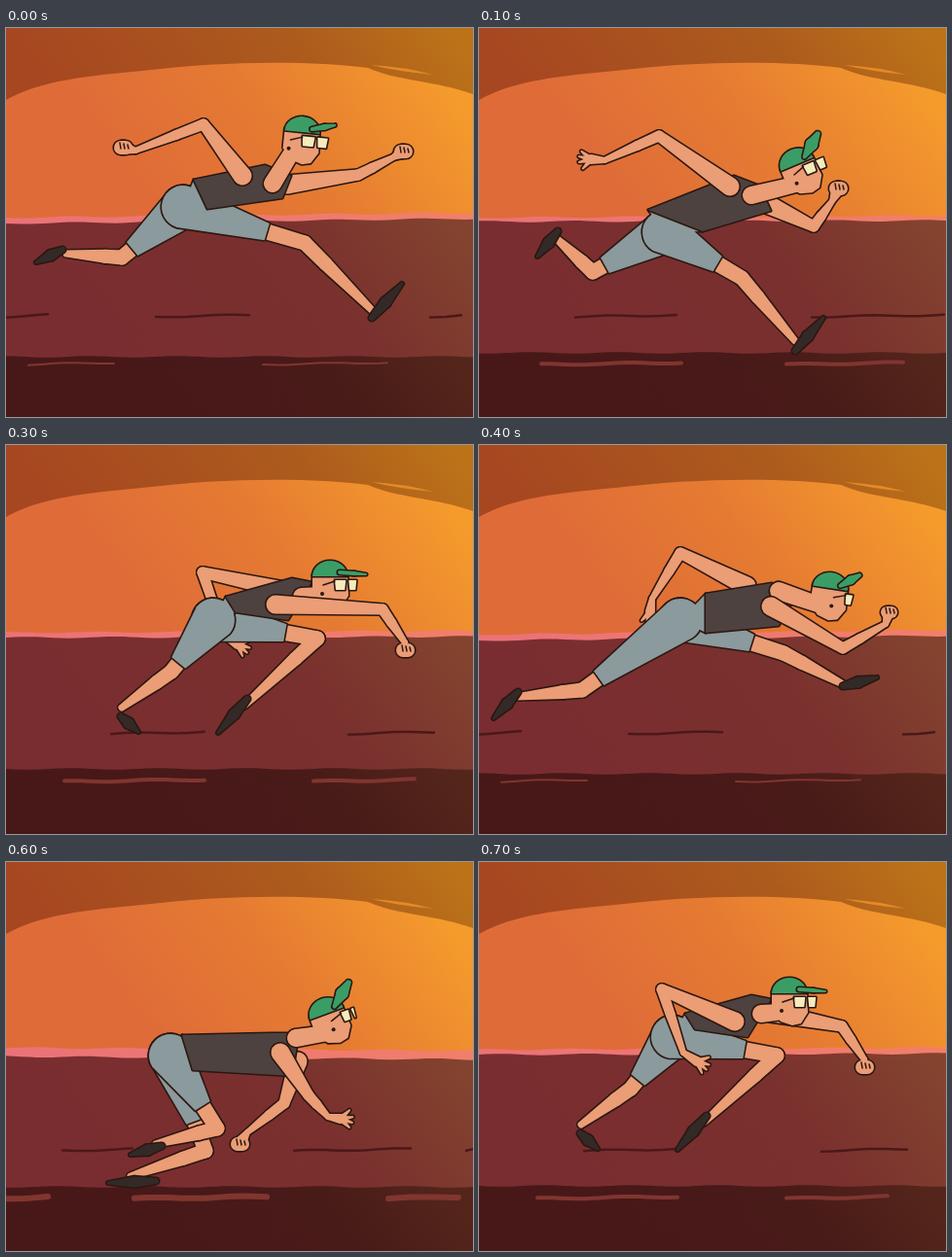
Animation, 480 px wide and 400 px high, one loop 800 ms. Source, as an HTML page with a canvas:

```html
<!DOCTYPE html>
<html>
<head>
<meta charset="utf-8">
<title>Sunset runner</title>
<style>
html, body { margin: 0; width: 100%; height: 100%; overflow: hidden; background: #7b2e30; }
canvas { display: block; }
</style>
</head>
<body>
<canvas id="stage" width="480" height="400"></canvas>
<script>
const ctx = document.getElementById('stage').getContext('2d');
const INK = '#2b1711', SKIN = '#eb9d75', TANK = '#4d4240', SHORTS = '#8b9a9c',
      SHOE = '#332a27', CAP = '#3b9d66', LENS = '#f5ebbd';

const points = s => s.split(' ').map(p => p.split(',').map(Number));
const mix = (a, b, t) => [a[0] + (b[0] - a[0]) * t, a[1] + (b[1] - a[1]) * t];

// Joints of one key pose. Torso: back waist, back shoulder, chest, belly, front waist.
// Head: place and tilt; turn: how far the face looks away; arm: elbow, wrist, hand
// (a third number makes it a fist); leg: knee, ankle, heel, toe.
function pose(torso, hip, shoulders, neck, head, turn, brim, nearArm, farArm, nearLeg, farLeg) {
  const p = points([hip, neck, head, brim].join(' '));
  return {
    torso: points(torso), hip: p[0], shoulders: points(shoulders), neck: p[1], head: p[2], turn, brim: p[3],
    arms: [nearArm, farArm].map(points), legs: [nearLeg, farLeg].map(points), shift: 0
  };
}
const swapped = (p, shift) => ({ ...p, arms: [...p.arms].reverse(), legs: [...p.legs].reverse(), shift });

const leap = pose('193,156 266,141 293,152 284,175 207,186', '182,184', '243,152 289,161',
  '274,160', '303,120,.1', 1, '338,100',
  '203,99 133,126 120,123,9', '362,151 398,133 408,127,9',
  '307,221 378,292 376,298 407,263', '119,236 62,232 58,228 31,241');
const land = pose('174,187 262,152 288,162 300,188 230,209', '190,210', '258,163 298,182',
  '280,172', '332,152,-.4', 5, '348,109',
  '185,111 129,136 102,134', '344,204 363,178 369,165,9',
  '270,257 325,322 325,332 354,298', '117,251 78,215 81,209 60,235');
const crouch = pose('195,178 287,176 315,176 308,220 206,214', '183,199', '296,196 314,205',
  '312,181', '348,168,-.35', 14, '366,124',
  '300,248 262,278 254,290,9', '325,240 345,262 370,266',
  '219,297 142,323 168,328 119,330', '231,274 168,290 174,292 142,301');
const stride = pose('233,153 301,142 323,160 308,186 233,193', '207,180', '300,166 275,145',
  '308,150', '359,160,.15', 17, '391,134',
  '374,209 418,184 421,172,8', '207,111 178,158 174,184',
  '106,252 38,259 40,254 15,281', '313,214 376,247 374,248 409,239');
const reach = pose('189,178 302,152 321,162 302,198 222,212', '198,207', '301,176 265,155',
  '310,160', '334,150,-.15', 17, '368,111',
  '380,193 381,172 379,164,8', '201,124 166,156 138,159',
  '122,267 60,226 55,219 30,251', '292,236 342,291 339,296 360,270');
const push = pose('212,156 280,137 300,141 276,180 222,172', '199,180', '263,164 300,155',
  '290,156', '319,148,0', 5, '356,133',
  '188,131 210,196 238,214', '373,169 396,203 396,211,9',
  '306,199 231,268 234,261 204,296', '156,233 105,270 104,279 122,295');
const poses = [leap, land, crouch, swapped(push, 14), stride, reach, swapped(crouch, -14), push];

// The ground repeats every four drawings. Stripe: heights of its upper and lower side at both ends.
const grounds = [
  { stripe: [195, 190, 201, 196], edge: 338, dark: [[-5, 47], [154, 253], [436, 473]], light: [[23, 118], [264, 392]], thick: 2 },
  { stripe: [195, 193, 199, 198], edge: 334, dark: [[99, 207], [342, 485]], light: [[64, 214], [316, 438]], thick: 4 },
  { stripe: [191, 194, 200, 203], edge: 334, dark: [[58, 137], [296, 416], [473, 485]], light: [[-5, 48], [132, 270], [393, 468]], thick: 6 },
  { stripe: [193, 191, 198, 197], edge: 333, dark: [[108, 206], [352, 440]], light: [[60, 207], [316, 420]], thick: 4 }
];

// Colour stops along the slanting light
function wash(...stops) {
  const g = ctx.createLinearGradient(0, 200, 389, -92);
  stops.forEach(([at, color]) => g.addColorStop(at, color));
  return g;
}
const sky = wash([0.25, '#a64721'], [0.72, '#ad5b1d'], [1, '#bc7318']);
const glow = wash([0.28, '#df6c38'], [0.58, '#e57b32'], [0.92, '#f59b2c']);
const pink = wash([0.1, '#eb7377'], [0.85, '#f28068']);
const soil = wash([0, '#7a2d30'], [0.45, '#7a302e'], [0.75, '#83432f']);
const shade = wash([0, '#481819'], [0.33, '#481a18'], [0.6, '#54261b']);

// Slightly shaky hand-drawn line
function shaky(x1, x2, y1, y2) {
  for (let x = x1; x <= x2; x += 8)
    ctx.lineTo(x, y1 + (y2 - y1) * (x - x1) / (x2 - x1) + 0.8 * Math.sin(x * 0.07 + y1));
}

function band(y1, y2, color) {
  ctx.fillStyle = color;
  ctx.beginPath();
  ctx.moveTo(0, 400);
  shaky(0, 480, y1, y2);
  ctx.lineTo(480, 400);
  ctx.fill();
}

function streak([x1, x2], y, width, color) {
  ctx.strokeStyle = color;
  ctx.lineWidth = width;
  ctx.beginPath();
  shaky(x1, x2, y + 1, y - 1);
  ctx.stroke();
}

function scenery({ stripe, edge, dark, light, thick }) {
  ctx.fillStyle = sky;
  ctx.fillRect(0, 0, 480, 400);
  ctx.fillStyle = glow;
  ctx.beginPath();
  ctx.moveTo(0, 74);
  ctx.bezierCurveTo(35, 54, 85, 49, 140, 44);
  ctx.bezierCurveTo(220, 34, 310, 33, 372, 41);
  ctx.bezierCurveTo(400, 54, 445, 55, 480, 68);
  ctx.lineTo(480, 220);
  ctx.lineTo(0, 220);
  ctx.fill();
  ctx.fillStyle = '#e48b25';
  ctx.fill(new Path2D('M375 38Q410 40 439 48Q405 45 375 38'));
  band(stripe[0], stripe[1], pink);
  band(stripe[2], stripe[3], soil);
  band(edge, edge, shade);
  dark.forEach(s => streak(s, 296, 2.5, '#4b1819'));
  light.forEach(s => streak(s, 345, thick, '#81352f'));
}

// One shape with a common outline, made of overlapping paths
function blob(color, ...paths) {
  ctx.strokeStyle = INK;
  ctx.lineWidth = 3.2;
  paths.forEach(p => ctx.stroke(p));
  ctx.fillStyle = color;
  paths.forEach(p => ctx.fill(p));
}

function polygon(pts) {
  const path = new Path2D();
  pts.forEach(([x, y]) => path.lineTo(x, y));
  path.closePath();
  return path;
}

// Tapered piece between two points, round or cut flat at the far end
function taper(a, b, ra, rb, flat) {
  const path = new Path2D(), q = Math.PI / 2, dir = Math.atan2(b[1] - a[1], b[0] - a[0]);
  path.arc(a[0], a[1], ra, dir + q, dir + 3 * q);
  if (flat) for (const side of [-q, q])
    path.lineTo(b[0] + rb * Math.cos(dir + side), b[1] + rb * Math.sin(dir + side));
  else path.arc(b[0], b[1], rb, dir - q, dir + q);
  path.closePath();
  return path;
}
const chain = (pts, radii) => pts.slice(1).map((p, i) => taper(pts[i], p, radii[i], radii[i + 1]));

function line(...pts) {
  ctx.strokeStyle = INK;
  ctx.lineWidth = 1.5;
  ctx.beginPath();
  pts.forEach(p => ctx.lineTo(...p));
  ctx.stroke();
}

function arm(shoulder, [elbow, wrist, hand]) {
  const [x, y, fist] = hand;
  const parts = chain([shoulder, elbow, mix(elbow, wrist, 0.4), wrist], [9.5, 5.5, 5, 3]);
  if (fist) {
    blob(SKIN, ...parts, taper(wrist, hand, 3, fist - 2), taper([x - 2, y], [x + 3, y], fist - 2, fist - 2));
    for (const i of [0, 1, 2]) line([x - 3 + i * 4, y - 5 + i], [x - 2 + i * 4, y + 1]);
    return;
  }
  const palm = mix(wrist, hand, 0.5), dir = Math.atan2(y - wrist[1], x - wrist[0]);
  const fingers = [-0.9, -0.3, 0.15, 0.6].map(spread =>
    taper(palm, [palm[0] + 13 * Math.cos(dir + spread), palm[1] + 13 * Math.sin(dir + spread)], 3, 1));
  blob(SKIN, ...parts, taper(wrist, palm, 3, 5), ...fingers);
}

function leg(hip, [knee, ankle, heel, toe], waist = []) {
  const hem = mix(hip, knee, knee[0] > hip[0] ? 0.69 : 0.83);
  blob(SKIN, ...chain([hip, knee, mix(knee, ankle, 0.3), ankle], [9, 7.5, 7, 3.5]));
  blob(SHOE, ...chain([heel, mix(heel, toe, 0.45), toe], [3, 5.5, 1.5]));
  blob(SHORTS, taper(hip, hem, 22, 9, true), ...waist);
}

function head({ head: [x, y, tilt], neck, turn, brim }) {
  const cos = Math.cos(tilt), sin = Math.sin(tilt);
  const at = (u, v) => [x + u * cos - v * sin, y + u * sin + v * cos];
  const face = [[-18, -15], [18, -15], [19, 7], [12, 18], [3, 20], [-9, 16], [-18, 5]];
  blob(SKIN, taper(neck, at(-7, 6), 9, 8), polygon(face.map(p => at(...p))));

  let left = turn;
  for (const width of [13 - turn * 0.35, 11 - turn * 0.6]) {
    if (width > 2) {
      const right = left + width;
      blob(LENS, polygon([at(left, -9), at(right, -9), at(right - 1, 1), at(left + 1, 1)]));
    }
    left += width + 3;
  }
  line(at(turn - 12, -4), at(turn, -8));
  ctx.fillStyle = INK;
  ctx.beginPath();
  ctx.arc(...at(turn - 13, 5), 2, 0, 7);
  ctx.fill();

  const dome = new Path2D(), root = at(10, -17), mid = mix(root, brim, 0.55);
  dome.ellipse(...at(0, -13), 18, 16, tilt, Math.PI, 0);
  dome.closePath();
  const rise = Math.max(0, Math.sin(Math.atan2(root[1] - brim[1], brim[0] - root[0])));
  blob(CAP, dome);
  blob(CAP, ...chain([root, mid, brim], [2, 2 + 5 * rise, 1 + 2 * rise]));
}

function runner(p) {
  const [back, , , , front] = p.torso;
  arm(p.shoulders[1], p.arms[1]);
  leg(p.hip, p.legs[1]);
  leg(p.hip, p.legs[0], [polygon([back, front, p.hip])]);
  blob(TANK, polygon(p.torso));
  head(p);
  arm(p.shoulders[0], p.arms[0]);
}

const start = performance.now();
function draw() {
  const i = Math.floor((performance.now() - start) / 100) % poses.length;
  ctx.lineJoin = ctx.lineCap = 'round';
  scenery(grounds[i % grounds.length]);
  ctx.save();
  ctx.translate(poses[i].shift, 0);
  runner(poses[i]);
  ctx.restore();
  requestAnimationFrame(draw);
}
draw();
</script>
</body>
</html>
```
